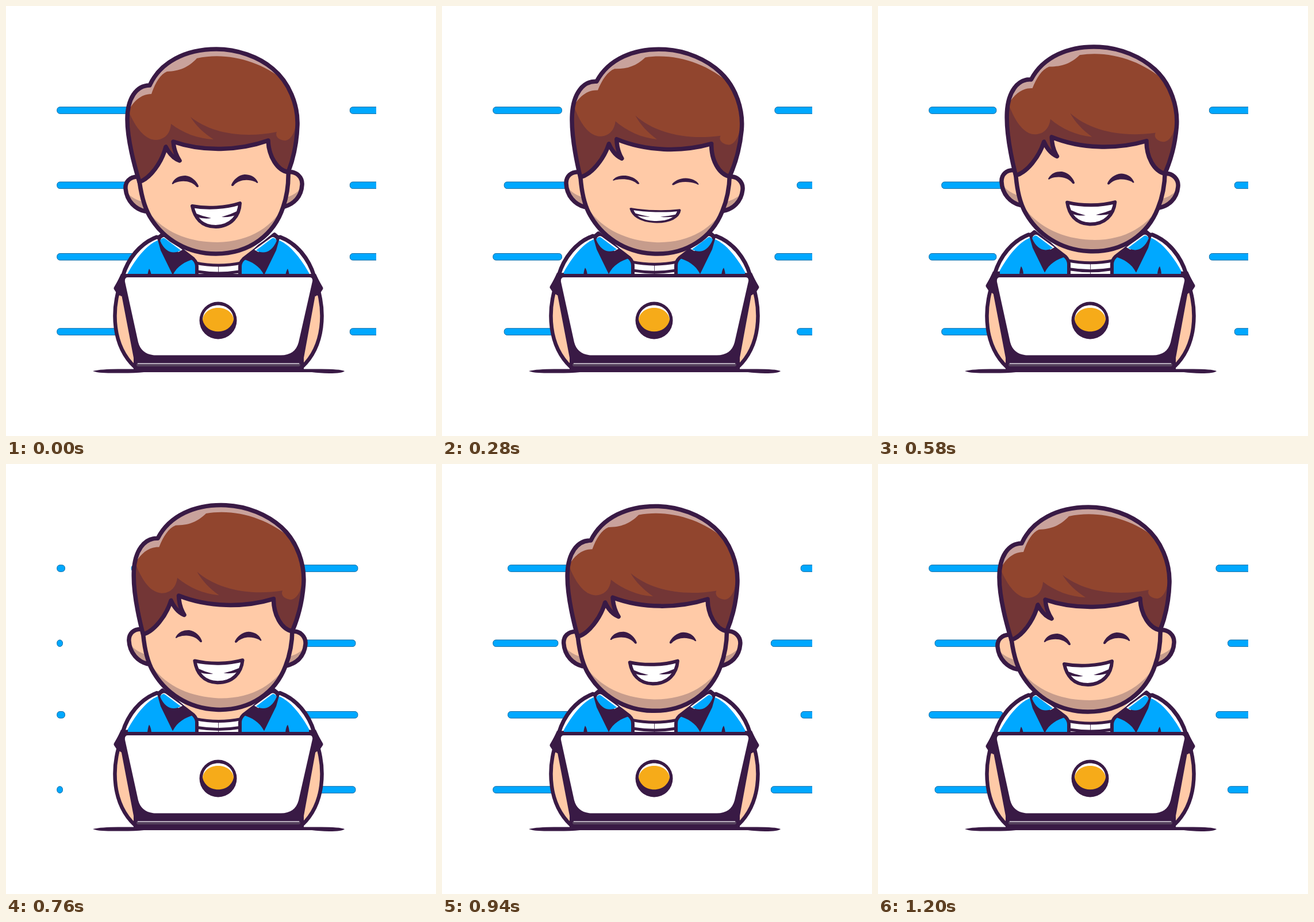
An HTML page that plays this animation: 748x748 px, repeating every 1220 ms.

```html
<!DOCTYPE html>
<html lang="en">
<head>
<meta charset="utf-8">
<title>At the laptop</title>
<style>
html, body { margin: 0; width: 100%; height: 100%; overflow: hidden; background: #fff; }
svg { display: block; width: 100vw; height: 100vh; }
.ink { fill: #391a45; }
.line { fill: none; stroke: #391a45; stroke-width: 7.5; stroke-linecap: round; stroke-linejoin: round; }
.blue { fill: #00a8ff; }
.skin { fill: #ffcaa7; }
.shade { fill: #c69c8c; }
.white { fill: #fff; }
.dash { fill: #00a8ff; stroke: #0b69a3; }
</style>
</head>
<body>
<svg viewBox="0 0 748 748">
  <defs>
    <path id="face" d="M231 296C235 333 242 352 250 366C275 408 318 431 365 431C425 431 467 396 482 350C489 330 492 310 491 285L455 200H260Z"/>
    <path id="earL" d="M229 297C215 297 207 306 208 318C210 340 226 354 242 357L250 320Z"/>
    <path id="earR" d="M491 289C505 287 516 298 515 311C514 332 500 345 484 349L474 310Z"/>
    <path id="hair" d="M232 306C221 270 211 230 211 197C211 162 226 138 250 138C268 98 312 75 366 75C402 75 439 88 464 109C493 133 508 172 507 207C506 238 499 268 491 289C472 286 457 262 456 234C405 252 343 254 291 236C292 250 296 260 302 269C291 265 283 255 278 245C271 272 251 300 232 306Z"/>
    <clipPath id="faceClip"><use href="#face"/></clipPath>
    <clipPath id="earLClip"><use href="#earL"/></clipPath>
    <clipPath id="earRClip"><use href="#earR"/></clipPath>
    <clipPath id="hairClip"><use href="#hair"/></clipPath>
    <clipPath id="window"><rect x="80" y="160" width="564" height="430"/></clipPath>
    <path id="eye" class="ink" d="M289 308C294 298 303 295 312 295C323 296 332 305 335 313C335 316 332 316 330 313C322 305 308 302 293 308C290 311 288 310 289 308Z"/>

    <g id="arm">
      <path class="skin" d="M198 486C184 530 184 590 224 628L245 626L215 480Z"/>
      <path class="line" style="stroke-width:6.5" d="M198 486C184 530 184 590 224 628"/>
    </g>
    <g id="side">
      <path class="white" d="M262 402C233 413 212 440 203 470L191 491L199 500L250 500H331V444Z"/>
      <path class="blue" d="M266 407C247 413 226 438 210 468L205 500H331V444Z"/>
      <path class="ink" d="M188 492L200 466L212 466V500L200 505Z"/>
      <path class="line" style="stroke-width:7" d="M262 402C233 413 212 440 203 470L191 491L197 500"/>
      <path class="ink" d="M246 470Q247 461 249 457Q252 461 253 470Z"/>
      <path class="ink" d="M262 400L269 425L290 468C298 452 311 445 327 440L300 415L272 396Z"/>
      <path class="line" style="stroke-width:6" d="M265 403L272 397L300 420L326 440Q332 446 332 453V480"/>
      <path class="white" d="M269 406Q273 400 278 403L307 424L300 428Z"/>
      <path class="blue" d="M268 408Q272 402 276 404L304 425C292 432 277 430 268 408Z"/>
    </g>
  </defs>

  <g id="dashes" clip-path="url(#window)"></g>

  <use href="#arm"/>
  <use href="#arm" transform="matrix(-1 0 0 1 739 0)"/>

  <g id="body">
    <path class="skin" d="M300 410H440L409 446Q370 456 330 446Z"/>
    <path class="white" d="M331 449Q370 456 408 449V485H331Z"/>
    <path class="line" style="stroke-width:5" d="M330 447Q370 455 409 447M333 462Q370 468 406 462"/>
    <path class="line" style="stroke-width:.8" d="M369.500 453V480"/>
    <use href="#side"/>
    <use href="#side" transform="matrix(-1 0 0 1 739 0)"/>
  </g>

  <g id="head">
    <use href="#earL" class="skin"/>
    <path class="shade" clip-path="url(#earLClip)" d="M205 318Q219 338 245 342V365H205Z"/>
    <use href="#earR" class="skin"/>
    <path class="shade" clip-path="url(#earRClip)" d="M520 308Q507 330 480 335V355H520Z"/>
    <path class="line" d="M229 297C215 297 207 306 208 318C210 340 226 354 242 357M491 289C505 287 516 298 515 311C514 332 500 345 484 349"/>
    <use href="#face" class="skin"/>
    <path class="shade" clip-path="url(#faceClip)" d="M238 344C266 391 314 411 368 411C424 410 468 384 490 335V440H238Z"/>
    <use href="#face" class="line"/>
    <use href="#hair" fill="#91452e"/>
    <g clip-path="url(#hairClip)">
      <path fill="#733636" d="M208 170C222 208 240 233 261 233C278 232 286 220 287 205C308 221 334 231 361 232C345 222 330 208 321 193C356 221 412 231 471 219C467 228 477 234 486 234C499 232 505 213 506 190L520 310H200Z"/>
      <path fill="#c9a29c" d="M208 192C218 170 232 153 253 153C259 135 268 119 280 114C302 113 317 107 332 91C382 80 440 94 483 129L500 140L470 70H220L200 150Z"/>
    </g>
    <use href="#hair" class="line"/>
    <g id="eyeL"><use href="#eye"/></g>
    <g id="eyeR"><use href="#eye" transform="matrix(-1 0 0 1 727 -2)"/></g>
    <g id="mouth">
      <path class="white" d="M324 348C350 353 383 351 407 343C406 365 392 383 365 384C340 384 328 368 324 348Z"/>
      <path class="ink" d="M328 360Q342 366 357 369Q345 371 331 367ZM404 356Q390 363 375 367Q390 368 402 363Z"/>
      <path class="line" style="stroke-width:6" d="M324 348C350 353 383 351 407 343C406 365 392 383 365 384C340 384 328 368 324 348Z"/>
    </g>
  </g>

  <path class="ink" d="M151 635Q166 631.500 195 631.500H548Q580 631.500 589 635Q585 639 562 639Q545 638.500 532 637H240Q220 639 190 638.500Q160 639 151 635Z"/>
  <path class="ink" d="M207 466H532Q541 466 541 476L540 492L518 612V634H222V612L199 492L198 476Q198 466 207 466Z"/>
  <path class="white" d="M212 472H528Q534 472 533 479L509 585Q503 607.500 478 607.500H262Q236 607.500 230 585L207 480Q206 472 212 472Z"/>
  <rect x="227" y="621" width="285" height="6" rx="3" fill="#54405c"/>
  <path d="M229 622H510" stroke="#d8d0dc" stroke-width="1.500"/>
  <circle class="ink" cx="369" cy="547" r="32.500"/>
  <path class="white" d="M342 546C343 512 395 512 396 546Z"/>
  <path fill="#f6ab19" d="M342 546C345 518 393 518 396 546C390 573 348 573 342 546Z"/>
</svg>
<script>
const LOOP = 1220, STEP = 20;
const PERIOD = 254.75, DASH = 140, LEFT = 88.3, SPEED = 0.8406;
const $ = id => document.getElementById(id);
const times = [0, 280, 440, 580, 760, 940, 1200];
const tilt = [0, 3.5, 3.35, 3.05, 2.6, 1.65, 0];
const lift = [0, 0, -2, -4.2, -3.6, -1.6, 0];

// Smooth curve through the keys, at rest at both ends
function follow(keys, t) {
  const last = times.length - 1;
  let i = 0;
  while (i < last - 1 && t > times[i + 1]) i++;
  const slope = k => k === 0 || k === last ? 0
    : (keys[k + 1] - keys[k - 1]) / (times[k + 1] - times[k - 1]);
  const d = times[i + 1] - times[i], u = (t - times[i]) / d, v = 1 - u;
  return keys[i] * v * v * (1 + 2 * u) + keys[i + 1] * u * u * (3 - 2 * u)
    + d * u * v * (slope(i) * v - slope(i + 1) * u);
}

const rows = [181.5, 311.8, 436.3, 566.6].map((y, i) => {
  const bars = Array.from({ length: 4 }, () => {
    const bar = document.createElementNS("http://www.w3.org/2000/svg", "rect");
    bar.setAttribute("class", "dash");
    bar.setAttribute("y", y - 5.8);
    bar.setAttribute("height", 11.6);
    bar.setAttribute("rx", 5);
    $("dashes").append(bar);
    return bar;
  });
  return { bars, dir: i % 2 ? -1 : 1 };
});

function slide({ bars, dir }, t) {
  const shift = ((dir * SPEED * t) % PERIOD + PERIOD) % PERIOD;
  bars.forEach((bar, k) => {
    const x = LEFT + shift + (k - 1) * PERIOD, from = Math.max(LEFT, x);
    bar.setAttribute("x", from + 0.5);
    bar.setAttribute("width", Math.max(0, x + DASH - from - 1));
  });
}

function squash(id, x, y, s) {
  $(id).setAttribute("transform", `translate(${x} ${y}) scale(1 ${s}) translate(${-x} ${-y})`);
}

function draw(t) {
  for (const row of rows) slide(row, t);
  const bob = -2.1 * (1 - Math.cos(2 * Math.PI * t / 1212));
  $("body").setAttribute("transform", `translate(0 ${bob})`);
  $("head").setAttribute("transform",
    `translate(0 ${follow(lift, t)}) rotate(${follow(tilt, t)} 369 444)`);
  const grin = t < 600 ? Math.sin(Math.PI * t / 600) ** 2 : 0;
  squash("mouth", 366, 365, 1 - 0.44 * grin);
  squash("eyeL", 312, 305, 1 - 0.34 * grin);
  squash("eyeR", 415, 303, 1 - 0.34 * grin);
}

const start = performance.now();
function tick() {
  const t = (performance.now() - start) % LOOP;
  draw(Math.floor(t / STEP) * STEP);
  requestAnimationFrame(tick);
}
draw(0);
requestAnimationFrame(tick);
</script>
</body>
</html>
```
